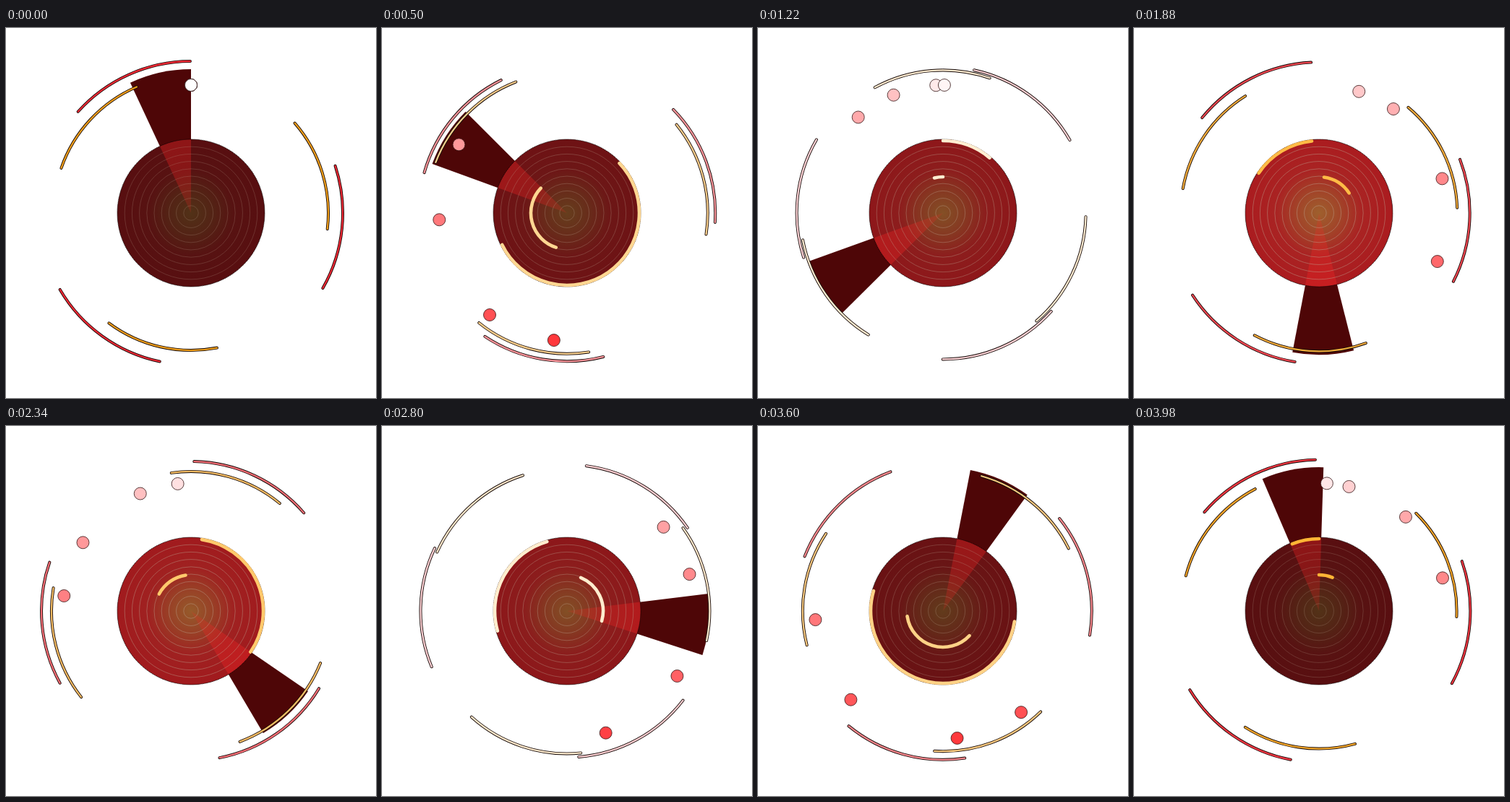
An HTML page for the animation above (4 s loop, 512x512 px).

```html
<!DOCTYPE html>
<html lang="en">
<head>
<meta charset="utf-8">
<title>Radar</title>
<style>
  html, body { margin: 0; width: 100%; height: 100%; overflow: hidden; background: #fff; }
  svg { display: block; width: 100vw; height: 100vh; }
</style>
</head>
<body>
<svg viewBox="0 0 512 512" fill="none">
  <defs>
    <radialGradient id="discFill" gradientUnits="userSpaceOnUse" cx="0" cy="0" r="102">
      <stop offset="0" stop-color="#cc7c3a"/>
      <stop offset=".28" stop-color="#d05a35"/>
      <stop offset=".58" stop-color="#da2e2d"/>
      <stop offset="1" stop-color="#dc2328"/>
    </radialGradient>
    <radialGradient id="beamFill" gradientUnits="userSpaceOnUse" cx="0" cy="0" r="102">
      <stop offset="0" stop-color="#ff2323" stop-opacity=".14"/>
      <stop offset=".3" stop-color="#ff2323" stop-opacity=".25"/>
      <stop offset="1" stop-color="#ff2323" stop-opacity=".33"/>
    </radialGradient>
  </defs>
  <g id="stage" transform="translate(256 256)"></g>
</svg>
<script>
const LOOP = 4000, TRIP = 1010, SWING = 2020, SWEEP = 1000;
const stage = document.getElementById('stage');

function add(tag, attrs, parent = stage) {
  const el = document.createElementNS('http://www.w3.org/2000/svg', tag);
  set(el, attrs);
  return parent.appendChild(el);
}
function set(el, attrs) {
  for (const key in attrs) el.setAttribute(key, attrs[key]);
}

// Angles are degrees clockwise from the top.
function at(r, deg) {
  const a = deg * Math.PI / 180;
  return `${(r * Math.sin(a)).toFixed(2)} ${(-r * Math.cos(a)).toFixed(2)}`;
}
function arc(r, from, to) {
  return `M${at(r, from)}A${r} ${r} 0 ${to - from > 180 ? 1 : 0} 1 ${at(r, to)}`;
}
const sector = (r, from, to) => arc(r, from, to) + 'L0 0Z';
const smooth = u => u * u * (3 - 2 * u);
const pingPong = u => 1 - Math.abs(1 - 2 * (u % 1));
const mix = (a, b, u) => `rgb(${a.map((v, i) => Math.round(v + (b[i] - v) * u))})`;

// Monotone cubic curve through [time, value] points.
function curve(points) {
  const slope = i => (points[i + 1][1] - points[i][1]) / (points[i + 1][0] - points[i][0]);
  const last = points.length - 1;
  const tangent = points.map((p, i) => {
    if (i === 0) return 0;
    if (i === last) return slope(i - 1);
    const a = slope(i - 1), b = slope(i);
    return a * b > 0 ? 2 * a * b / (a + b) : 0;
  });
  return t => {
    let i = 0;
    while (i < last - 1 && t > points[i + 1][0]) i++;
    const [t0, v0] = points[i], [t1, v1] = points[i + 1];
    const h = t1 - t0, u = (t - t0) / h, w = 1 - u;
    return v0 * w * w * (1 + 2 * u) + v1 * u * u * (3 - 2 * u)
      + h * u * w * (tangent[i] * w - tangent[i + 1] * u);
  };
}

const redTurn = curve([[0, 0], [500, 93.9], [780, 175.7], [1220, 300.4], [1880, 357.3], [1960, 358.9], [SWING, 360]]);
const goldTurn = curve([[0, 0], [500, 122], [780, 245.3], [1220, 402.4], [1880, 471.1], [1960, 475.7], [SWING, 480]]);
const sweepTail = curve([[0, 0], [240, 0], [500, 46.5], [800, 254], [880, 303.5], [980, 338.3], [SWEEP, 345]]);
const rimHead = curve([[0, 0], [220, 40.2], [240, 49.5], [500, 243.9], [800, 343.9], [880, 354.3], [980, 360], [SWEEP, 360]]);
const innerHead = curve([[0, 0], [220, 13.8], [240, 17.4], [500, 162.3], [800, 337.6], [880, 352], [980, 360], [SWEEP, 360]]);

const WHITE = [255, 255, 255], RED = [234, 40, 52], GOLD = [236, 156, 26];
const AMBER = [255, 176, 40], DOT_RED = [255, 52, 56];

const wedge = add('path', { fill: '#4e0607' });
add('circle', { r: 102, fill: '#000' });
const disc = add('circle', { r: 102, fill: 'url(#discFill)' });
const beam = add('path', { fill: 'url(#beamFill)' });
const grooves = add('g', { stroke: '#beaa96' });
for (let i = 1; i < 10; i++) add('circle', { r: i * 10.2 }, grooves);
add('circle', { r: 102, stroke: '#000', 'stroke-dasharray': '1 1' });

const sweepStyle = { 'stroke-width': 4.6, 'stroke-linecap': 'round' };
const rim = add('path', sweepStyle);
const inner = add('path', sweepStyle);

function ring() {
  const group = add('g', { 'stroke-linecap': 'round' });
  return {
    group,
    edge: add('path', { stroke: '#140806', 'stroke-width': 4 }, group),
    core: add('path', { 'stroke-width': 2.3 }, group)
  };
}
const goldRing = ring(), redRing = ring();

const dots = [0, 59, 158, 238].map(delay => ({
  delay,
  el: add('circle', { r: 8.5, stroke: '#301414', 'stroke-width': .8 })
}));

function drawRing({ group, edge, core }, r, from, to, turn, stroke) {
  const d = [0, 120, 240].map(k => arc(r, from + k, to + k)).join('');
  set(group, { transform: `rotate(${turn})` });
  set(edge, { d });
  set(core, { d, stroke });
}

function drawSweep(el, r, from, to, stroke) {
  set(el, { d: to - from > .5 ? arc(r, from, to) : '', stroke });
}

function draw(t) {
  const spin = -360 * t / LOOP;
  const wedgeRadius = 197.5 + 1.4 * Math.cos(2 * Math.PI * t / LOOP);
  const light = .4 + .4 * pingPong(t / LOOP);
  set(wedge, { d: sector(wedgeRadius, spin - 25, spin) });
  set(beam, { d: sector(102, spin - 25, spin) });
  set(disc, { opacity: light });
  set(grooves, { opacity: light * .55 });

  const swing = t % SWING, pale = pingPong(swing / SWING);
  drawRing(goldRing, 190 + 9.6 * pale, -70.9, -23.3, goldTurn(swing), mix(GOLD, WHITE, pale));
  drawRing(redRing, 210 - 9.6 * pale, -48.1, -.3, redTurn(swing), mix(RED, WHITE, pale));

  const s = t % SWEEP, tail = sweepTail(s), glow = mix(AMBER, WHITE, pale);
  drawSweep(rim, 100, tail, rimHead(s), glow);
  drawSweep(inner, 50, -innerHead(s), -tail, glow);

  // Dots lag slightly on odd trips and lead on even ones.
  const lag = 6 * Math.sin(2 * Math.PI * t / SWING);
  for (const { delay, el } of dots) {
    const u = Math.max(0, t - delay - lag) % TRIP / TRIP;
    const [cx, cy] = at(177, -360 * smooth(u)).split(' ');
    set(el, { cx, cy, fill: mix(WHITE, DOT_RED, pingPong(u)) });
  }
}

let start;
function tick(now) {
  start ??= now;
  draw((now - start) % LOOP);
  requestAnimationFrame(tick);
}
draw(0);
requestAnimationFrame(tick);
</script>
</body>
</html>
```
